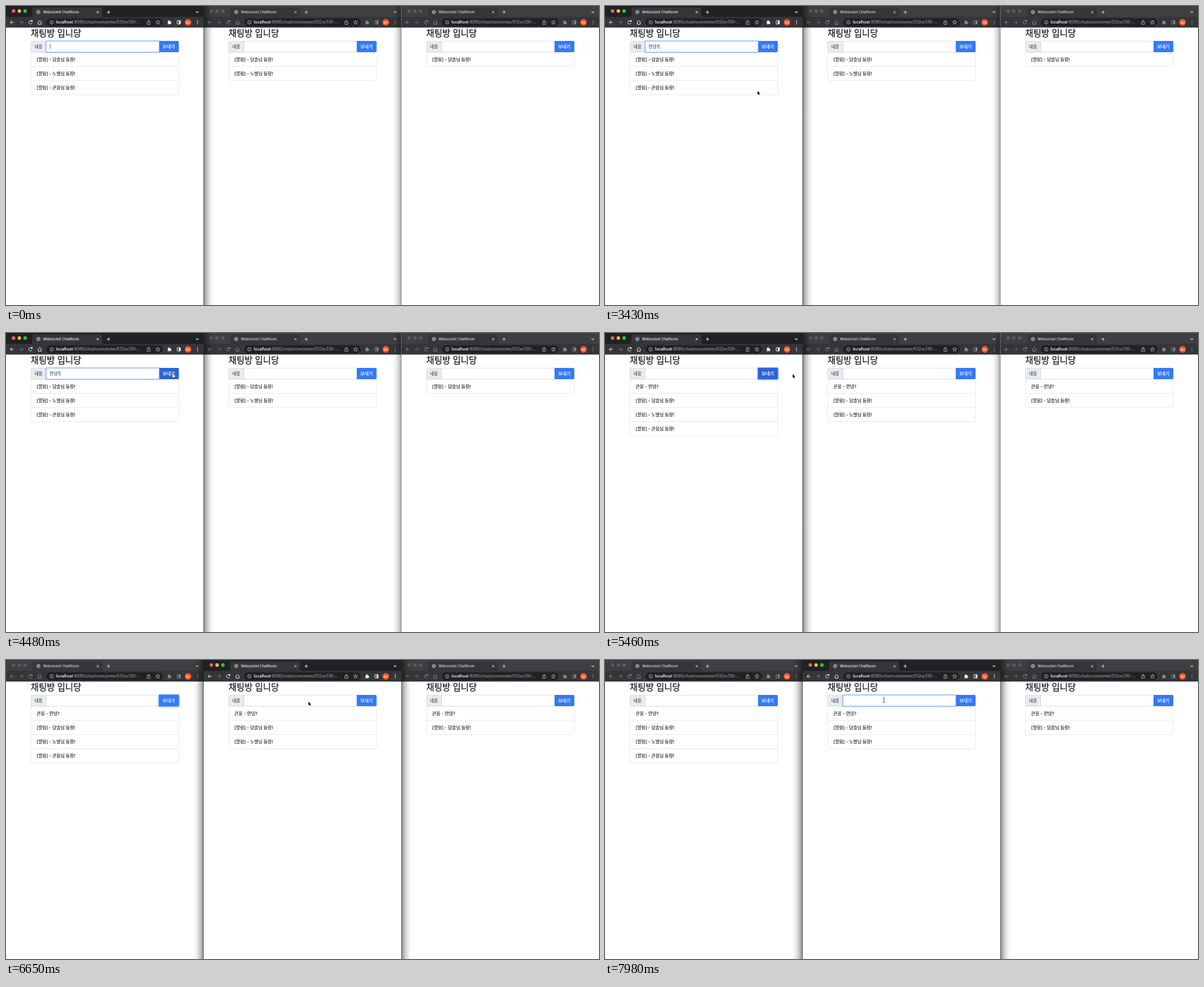
Animation of 1054 by 531 pixels, one loop 8000 ms. Source, as an HTML page with a canvas:

```html
<!DOCTYPE html>
<html lang="ko">
<head>
<meta charset="utf-8">
<title>Websocket ChatRoom</title>
<style>
html, body { margin: 0; width: 100%; height: 100%; overflow: hidden; background: #fff; }
canvas { display: block; width: 1054px; height: 531px; }
</style>
</head>
<body>
<canvas id="stage"></canvas>
<script>
const W = 1054, H = 531, LOOP = 8000, STEP = 70;
const PANE = 351.5, BAR_END = 38.3, BLINK = 525;
const FONT = 'Inter, "Noto Sans CJK KR", "Noto Sans CJK", sans-serif';
const GUESTS = ['담솔', '노별', '큰몽'];
const canvas = document.getElementById('stage');
const dpr = window.devicePixelRatio || 1;
canvas.width = Math.round(W * dpr);
canvas.height = Math.round(H * dpr);
const c = canvas.getContext('2d');

// Moments of the story, in ms.
const PRESS = 4720, SENT = 4830, SWITCH = 6650, REFOCUS = 7420;
const KEYS = [[0, ''], [70, 'ㅇ'], [140, '아'], [280, '안'], [490, '안ㄴ'],
  [560, '안녀'], [630, '안녕'], [2340, '안녕?'], [SENT, ''], [REFOCUS, '']];

// Pointer moves: start, end and a cubic curve.
const MOVES = [
  { from: 3290, to: 4480, curve: [[324, 185], [186, 125], [350, 108], [297.3, 71.5]] },
  { from: 5390, to: 6300, curve: [[297.3, 71.5], [361, 64], [565, 142], [537.5, 74]] },
  { from: 6650, to: 7140, curve: [[537.5, 74], [523, 73], [510, 72], [495.8, 71.5]] }
];

const clamp = v => Math.max(0, Math.min(1, v));
const mix = (a, b, k) => a + (b - a) * k;
const ease = (t, start, span = 150) => {
  const k = clamp((t - start) / span);
  return k * k * (3 - 2 * k);
};
const bezier = ([a, b, d, e], k) => {
  const m = 1 - k;
  return m * m * m * a + 3 * m * m * k * b + 3 * m * k * k * d + k * k * k * e;
};

function pointerAt(t) {
  const move = MOVES.filter(m => m.from <= t).pop();
  if (!move) return null;
  const k = 1 - (1 - clamp((t - move.from) / (move.to - move.from))) ** 2;
  return [0, 1].map(axis => bezier(move.curve.map(p => p[axis]), k));
}

function rect(x, y, w, h, fill) {
  c.fillStyle = fill;
  c.fillRect(x, y, w, h);
}
function box(x, y, w, h, r, fill, stroke, width = 0.6) {
  c.beginPath();
  c.roundRect(x, y, w, h, r);
  if (fill) { c.fillStyle = fill; c.fill(); }
  if (stroke) { c.strokeStyle = stroke; c.lineWidth = width; c.stroke(); }
}
function dot(x, y, r, fill) {
  c.beginPath();
  c.arc(x, y, r, 0, 7);
  c.fillStyle = fill;
  c.fill();
}
function ring(x, y, r, color, width, from = 0, to = 7) {
  c.beginPath();
  c.arc(x, y, r, from, to);
  c.lineWidth = width;
  c.strokeStyle = color;
  c.stroke();
}
// Each argument after the width is a flat polyline.
function lines(color, width, ...paths) {
  c.strokeStyle = color;
  c.lineWidth = width;
  c.beginPath();
  for (const p of paths) {
    for (let i = 0; i < p.length; i += 2) i ? c.lineTo(p[i], p[i + 1]) : c.moveTo(p[0], p[1]);
  }
  c.stroke();
}
// A hairline outline gives the text its slightly heavier weight.
function text(str, x, y, size, fill, extra = 0.2) {
  c.font = `${size}px ${FONT}`;
  c.fillStyle = c.strokeStyle = fill;
  c.lineWidth = extra;
  c.fillText(str, x, y);
  c.strokeText(str, x, y);
  return c.measureText(str).width;
}

function globe(x, y) {
  dot(x, y, 3.4, '#55575b');
  ring(x, y, 3.1, '#c4c6c9', 0.7);
  lines('#c4c6c9', 1, [x - 2.8, y - 0.8, x - 0.4, y + 0.4, x - 0.6, y + 2.6], [x + 0.2, y - 2.6, x + 0.8, y - 0.9, x + 2.6, y - 0.4]);
}

function tabStrip(active) {
  rect(-1, 0, PANE + 2, 20, active ? '#202124' : '#3e3f42');
  const lights = active ? ['#ff5f57', '#febc2e', '#28c840'] : Array(3).fill('#58595c');
  lights.forEach((col, i) => dot(13.4 + i * 10.3, 8.9, 3.1, col));

  c.fillStyle = '#35363a';
  c.beginPath();
  c.moveTo(43, 19.5);
  c.arcTo(47, 19.5, 47, 15.5, 4);
  c.arcTo(47, 2.5, 51, 2.5, 4);
  c.arcTo(171, 2.5, 171, 6.5, 4);
  c.arcTo(171, 19.5, 175, 19.5, 4);
  c.lineTo(175, 19.5);
  c.fill();

  globe(57.6, 10.8);
  const ink = active ? '#e8eaed' : '#d4d5d7';
  text('Websocket ChatRoom', 66, 13, 6.1, ink, 0.12);
  lines(ink, 0.9, [161, 9, 165, 13], [165, 9, 161, 13]);
  lines(ink, 1, [179.2, 11, 185.2, 11], [182.2, 8, 182.2, 14]);
  lines(ink, 1.1, [337.6, 9.6, 340, 12, 342.4, 9.6]);
}

function star(x, y, r, color) {
  c.beginPath();
  for (let i = 0; i < 10; i++) {
    const a = -Math.PI / 2 + i * Math.PI / 5, d = i % 2 ? r * 0.45 : r;
    c.lineTo(x + d * Math.cos(a), y + d * Math.sin(a));
  }
  c.closePath();
  c.strokeStyle = color;
  c.lineWidth = 0.8;
  c.stroke();
}

function arrowIcon(x, dir, color) {
  const tip = x + dir * 3.2, barb = x + dir * 0.1;
  lines(color, 1, [x - dir * 3.2, 29, tip, 29], [barb, 25.9, tip, 29, barb, 32.1]);
}

function toolbar(active, port) {
  rect(-1, 19.4, PANE + 2, BAR_END - 19.4, '#35363a');
  const ink = active ? '#f1f3f4' : '#898a8d', pale = '#c4c6c9';
  arrowIcon(10.8, -1, ink);
  arrowIcon(27.2, 1, active ? '#7c7d80' : '#707174');
  ring(43.6, 29, 3, ink, 1, 0.4, 5.5);
  rect(44.6, 25.5, 2.6, 2.6, ink);
  lines(ink, 1, [56.4, 29.2, 60, 25.7, 63.6, 29.2], [57.5, 28.5, 57.5, 32.4, 62.5, 32.4, 62.5, 28.5]);

  box(71.5, 21.8, 207.5, 14.4, 7.2, '#202124');
  ring(81.2, 29, 3.1, pale, 0.8);
  lines(pale, 0.9, [81.2, 28.6, 81.2, 30.8], [81.2, 26.9, 81.2, 27.7]);
  const host = text('localhost', 89, 31.4, 7.05, '#f1f3f4');
  text(`:${port}/chat/room/enter/532ec130-...`, 89 + host, 31.4, 7.05, '#9aa0a6', 0.1);
  lines(pale, 0.8, [252, 27.6, 250.9, 27.6, 250.9, 32.6, 256.1, 32.6, 256.1, 27.6, 255, 27.6],
    [253.5, 30.4, 253.5, 25.4], [251.9, 26.9, 253.5, 25.3, 255.1, 26.9]);
  star(270, 29.2, 3.9, pale);

  box(287.4, 27, 5.2, 5.6, 0.7, ink);
  dot(289.9, 26.7, 1.3, ink);
  dot(292.9, 29.8, 1.3, ink);
  dot(287.3, 29.8, 0.9, '#35363a');
  dot(289.9, 32.6, 0.9, '#35363a');
  box(304.2, 26, 5.8, 6, 0.5, null, ink, 1);
  rect(307.2, 26, 2.8, 6, ink);
  dot(323.5, 29, 5.9, '#f4511e');
  text('해담', 319.4, 30.7, 4.4, '#fff', 0.1);
  for (let i = -1; i <= 1; i++) dot(340.4, 29 + i * 2.6, 0.85, ink);
}

function messages(s, i) {
  const rows = GUESTS.slice(0, 3 - i).map(n => `[알림] - ${n}님 등장!`);
  if (s.sent) rows.unshift(`${GUESTS[2]} - 안녕?`);
  const rowH = 25.15, top = 82.1;
  box(44.3, top, 262.6, rowH * rows.length, 2, '#fff', '#d8d8d8');
  rows.forEach((row, n) => {
    const y = top + n * rowH;
    if (n) lines('#d8d8d8', 0.6, [44.3, y, 306.9, y]);
    text(row, 54.6, y + 15.5, 7.8, '#212529');
  });
}

function page(s, i) {
  rect(-1, BAR_END, PANE + 2, H, '#fff');
  text('채팅방 입니당', 43.9, 53.7, 15.5, '#212529', 0.3);
  messages(s, i);

  box(44.3, 62.4, 27.2, 19.5, [2, 0, 0, 2], '#e9ecef', '#c6cbd0');
  text('내용', 50.7, 74.9, 7.6, '#495057');
  box(71.5, 62.4, 200.8, 19.5, 0, '#fff', '#c6cbd0');

  const hover = i ? 0 : s.hover, glow = i ? 0 : s.buttonRing;
  if (glow) box(271.2, 61.4, 36.8, 21.5, 3, null, `rgba(60,140,250,${0.6 * glow})`, 1.7);
  const blue = [mix(52, 41, hover), mix(121, 101, hover), mix(247, 214, hover)].map(Math.round);
  box(272, 62.1, 35.2, 20, [0, 2, 2, 0], `rgb(${blue})`);
  text('보내기', 278.6, 74.9, 7.8, '#fff');

  const focus = s.inputRing[i];
  if (focus) {
    box(70.7, 61.5, 202.4, 21.3, 1, null, `rgba(60,140,250,${0.3 * focus})`, 1.7);
    box(71.5, 62.4, 200.8, 19.5, 0, null, `rgba(115,178,255,${focus})`, 0.8);
    const w = text(s.typed, 77.6, 74.9, 7.6, '#495057');
    if (s.caret) rect(77.9 + w, 67.2, 0.65, 9.4, '#222');
  }
}

function shadow(x, dir, reach, strength) {
  const g = c.createLinearGradient(x, 0, x + dir * reach, 0);
  for (let k = 0; k <= 1; k += 0.25) g.addColorStop(k, `rgba(0,0,0,${strength * (1 - k) ** 2})`);
  rect(Math.min(x, x + dir * reach), 0, reach, H, g);
}

function drawWindow(i, s) {
  const x = i * PANE, active = i === s.active;
  const left = x - 0.6, right = x + PANE + 0.1;
  const reach = active ? 20 : 17, strength = active ? 0.44 : 0.32;
  shadow(left, -1, reach, strength);
  shadow(right, 1, reach, strength);
  c.save();
  c.beginPath();
  c.rect(left, 0, right - left, H);
  c.clip();
  c.translate(x, 0);
  page(s, i);
  tabStrip(active);
  toolbar(active, i < 2 ? 8080 : 8090);
  c.restore();
  const edge = active ? '#222' : '#777';
  if (i > 0) rect(left - 0.4, 0, 0.8, H, edge);
  if (i < 2) rect(right - 0.4, 0, 0.8, H, edge);
}

function arrow() {
  c.scale(0.88, 0.88);
  c.beginPath();
  c.moveTo(0, 0);
  c.lineTo(0, 7.4);
  c.lineTo(1.7, 5.9);
  c.lineTo(2.8, 8.5);
  c.lineTo(4.1, 7.9);
  c.lineTo(3, 5.4);
  c.lineTo(5.3, 5.3);
  c.closePath();
  c.lineWidth = 1;
  c.strokeStyle = '#fff';
  c.stroke();
  c.fillStyle = '#000';
  c.fill();
}
function hand() {
  const shape = (grow, fill) => {
    box(-0.6 - grow, -grow, 1.4 + 2 * grow, 5 + 2 * grow, 0.7 + grow, fill);
    box(-1.8 - grow, 3.2 - grow, 5 + 2 * grow, 4 + 2 * grow, 1.4 + grow, fill);
  };
  shape(0.5, '#111');
  shape(0, '#fff');
}
function beam() {
  const serif = d => [-1.8, 4.4 * d, -0.7, 4.2 * d, 0, 3.4 * d, 0.7, 4.2 * d, 1.8, 4.4 * d];
  const paths = [serif(-1), [0, -3.4, 0, 3.4], serif(1)];
  lines('#fff', 1.6, ...paths);
  lines('#111', 0.8, ...paths);
}

function draw(t) {
  const [keyTime, typed] = KEYS.filter(k => k[0] <= t).pop();
  const s = {
    active: t < SWITCH ? 0 : 1,
    sent: t >= SENT,
    typed,
    caret: t < PRESS || t >= REFOCUS ? Math.floor((t - keyTime) / BLINK) % 2 === 0 : false,
    hover: ease(t, 4190) - ease(t, 5455),
    buttonRing: ease(t, PRESS) - ease(t, SWITCH + 40),
    inputRing: [1 - ease(t, PRESS), ease(t, REFOCUS - 30), 0]
  };
  c.setTransform(canvas.width / W, 0, 0, canvas.height / H, 0, 0);
  rect(0, 0, W, H, '#fff');
  const order = s.active ? [0, 2, 1] : [1, 2, 0];
  order.forEach(i => drawWindow(i, s));

  const pos = pointerAt(t);
  if (pos) {
    c.translate(...pos);
    if (t >= 4200 && t < 5460) hand();
    else if (t > SWITCH) beam();
    else arrow();
  }
}

function tick(now) {
  draw(Math.floor((now % LOOP) / STEP) * STEP);
  requestAnimationFrame(tick);
}
draw(0);
requestAnimationFrame(tick);
</script>
</body>
</html>
```
